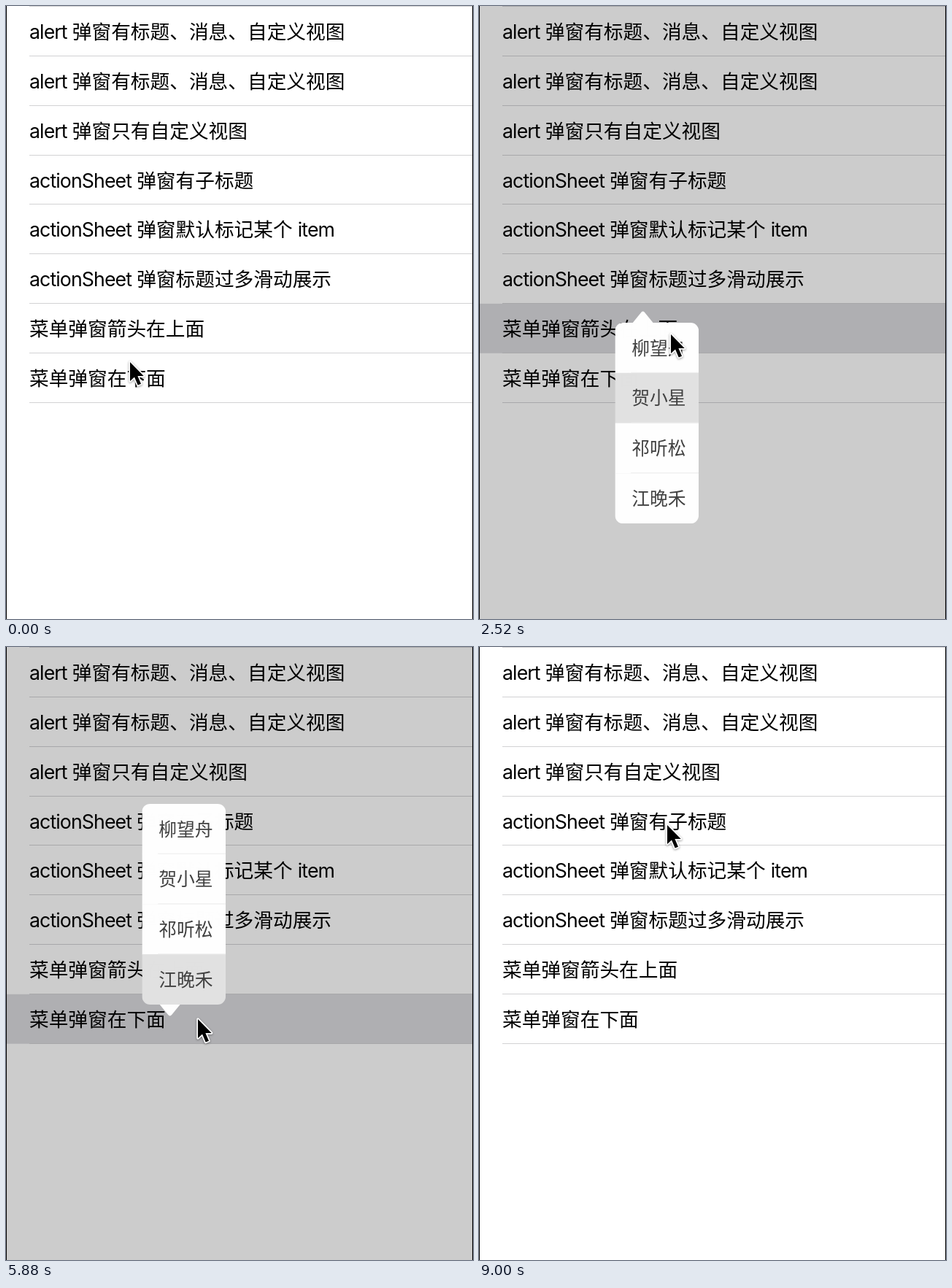
Recreate the animation shown at these times as an HTML page. Size 640 px wide and 840 px high, loop 9.16 s.

```html
<!DOCTYPE html>
<html lang="zh-CN">
<head>
<meta charset="utf-8">
<title>弹窗菜单</title>
<style>
  html, body { margin: 0; width: 100%; height: 100%; overflow: hidden; background: #fff; }
  svg { display: block; width: 640px; height: 840px; }
  text { font-family: Inter, "Noto Sans CJK SC", sans-serif; font-size: 26.7px; fill: #000; white-space: pre; }
  .latin { letter-spacing: -.9px; word-spacing: .5px; }
  .item { font-size: 25px; fill: #404040; }
  #cursor { filter: drop-shadow(0 1.5px 1.5px rgba(0, 0, 0, .4)); }
</style>
</head>
<body>
<svg id="stage" viewBox="0 0 640 840"></svg>
<script>
const LOOP = 9160, STEP = 40;
const ROW = 67.9, ITEM = 69.3;
const LEFT = 186, WIDTH = 115.5, HEIGHT = ITEM * 4, ARROW = 16;

const titles = [
  'alert 弹窗有标题、消息、自定义视图',
  'alert 弹窗有标题、消息、自定义视图',
  'alert 弹窗只有自定义视图',
  'actionSheet 弹窗有子标题',
  'actionSheet 弹窗默认标记某个 item',
  'actionSheet 弹窗标题过多滑动展示',
  '菜单弹窗箭头在上面',
  '菜单弹窗在下面'
];
const items = ['柳望舟', '贺小星', '祁听松', '江晚禾'];

// Item already selected and item touched are indexes; -1 means none.
const sessions = [
  { open: 440, close: 1720, row: 6, selected: -1, touch: 1520, touched: 1 },
  { open: 2360, close: 3400, row: 6, selected: 1, touch: 3200, touched: 2 },
  { open: 4040, close: 5120, row: 6, selected: 2, touch: 4960, touched: 3 },
  { open: 5720, close: 7200, row: 7, selected: 3, touch: 7040, touched: 2 },
  { open: 7800, close: 9000, row: 7, selected: 2, touch: 8800, touched: 0 }
];

// Pointer stops: time, x, y
const stops = [
  [0, 169, 486], [40, 169, 486], [280, 163, 440], [880, 163, 440],
  [1480, 262, 534], [1680, 262, 534], [2200, 262, 446], [2480, 262, 446],
  [3040, 264, 602], [3520, 264, 602], [3960, 286, 450], [4280, 286, 450],
  [4920, 262, 661], [5080, 262, 661], [5600, 262, 508], [6160, 262, 508],
  [6960, 260, 390], [7320, 260, 390], [7640, 305, 515], [8080, 305, 515],
  [8720, 257, 242], [LOOP, 257, 242]
];

const stage = document.getElementById('stage');
const clamp = x => Math.min(1, Math.max(0, x));
const ease = x => (1 - Math.cos(Math.PI * clamp(x))) / 2;

function add(parent, tag, attrs = {}, content = '') {
  const node = document.createElementNS('http://www.w3.org/2000/svg', tag);
  for (const key in attrs) node.setAttribute(key, attrs[key]);
  node.textContent = content;
  return parent.appendChild(node);
}
const rect = (parent, x, y, width, height, fill) =>
  add(parent, 'rect', { x, y, width, height, fill });

function addTitle(title, i) {
  const line = add(stage, 'text', { x: 32, y: 44.8 + i * ROW });
  for (const part of title.match(/[\x20-\x7e]+|[^\x20-\x7e]+/g))
    add(line, 'tspan', part.charCodeAt(0) < 127 ? { class: 'latin' } : {}, part);
}

function addMenu(top, arrowUp) {
  const group = add(stage, 'g');
  const clip = add(add(group, 'clipPath', { id: 'clip' + Math.round(top) }), 'rect',
    { x: LEFT, y: top, width: WIDTH, height: HEIGHT, rx: 11 });
  const base = arrowUp ? top : top + HEIGHT;
  const dir = arrowUp ? -1 : 1;
  add(group, 'path', {
    d: `M210.5 ${base}L222 ${base + dir * (ARROW - 2)}Q224.5 ${base + dir * (ARROW + 1)} 227 ${base + dir * (ARROW - 2)}L238.5 ${base}Z`,
    fill: '#fff'
  });
  const body = add(group, 'g', { 'clip-path': `url(#${clip.parentNode.id})` });
  const cells = items.map((name, i) => rect(body, LEFT, top + i * ITEM, WIDTH, ITEM + .3, '#fff'));
  items.forEach((name, i) => {
    if (i) rect(body, 208, top + i * ITEM - 1, 94, 1, '#ededed');
    add(body, 'text', { class: 'item', x: 209, y: top + i * ITEM + 44 }, name);
  });
  return { group, cells, cy: top + (HEIGHT + dir * ARROW) / 2 };
}

rect(stage, 0, 0, 640, 840, '#fff');
const highlight = rect(stage, 0, 0, 640, ROW, '#d1d1d6');
for (let i = 0; i <= titles.length; i++) rect(stage, 32, Math.floor(i * ROW + .35), 608, 1, '#d2d2d4');
titles.forEach(addTitle);
const shade = rect(stage, 0, 0, 640, 840, '#000');
const menus = { 6: addMenu(433, true), 7: addMenu(213.8, false) };
rect(stage, 0, 0, 1, 840, '#000');
rect(stage, 639, 0, 1, 840, '#000');
const cursor = add(stage, 'g', { id: 'cursor' });
add(cursor, 'path', {
  d: 'M1 2V28L7 22.5L11.7 33.5L16 31.7L11.4 21H19.7Z',
  fill: '#000', stroke: '#fff', 'stroke-width': 3.4, 'paint-order': 'stroke', 'stroke-linejoin': 'round'
});

function moveCursor(t) {
  const next = stops.findIndex(stop => stop[0] > t);
  const [t0, x0, y0] = stops[next - 1], [t1, x1, y1] = stops[next];
  const p = ease((t - t0) / (t1 - t0));
  cursor.setAttribute('transform', `translate(${x0 + (x1 - x0) * p} ${y0 + (y1 - y0) * p})`);
}

function showMenu(session, t) {
  const p = session ? ease((t - session.open) / 170) : 0;
  shade.setAttribute('opacity', p * .2);
  for (const row in menus) menus[row].group.setAttribute('opacity', session && session.row == row ? p : 0);
  highlight.setAttribute('opacity', session && p ? 1 - clamp((t - session.open - 120) / 200) : 0);
  if (!session) return;

  const { group, cells, cy } = menus[session.row];
  const scale = .1 + .9 * p, cx = LEFT + WIDTH / 2;
  group.setAttribute('transform', `translate(${cx} ${cy}) scale(${scale}) translate(${-cx} ${-cy})`);
  highlight.setAttribute('y', session.row * ROW + .5);
  cells.forEach((cell, i) => {
    const active = i === session.selected || (i === session.touched && t >= session.touch);
    cell.setAttribute('fill', active ? '#e2e2e2' : '#fff');
  });
}

const start = performance.now();
function draw() {
  const t = Math.floor((performance.now() - start) % LOOP / STEP) * STEP;
  moveCursor(t);
  showMenu(sessions.find(s => t >= s.open && t < s.close), t);
  requestAnimationFrame(draw);
}
draw();
</script>
</body>
</html>
```
